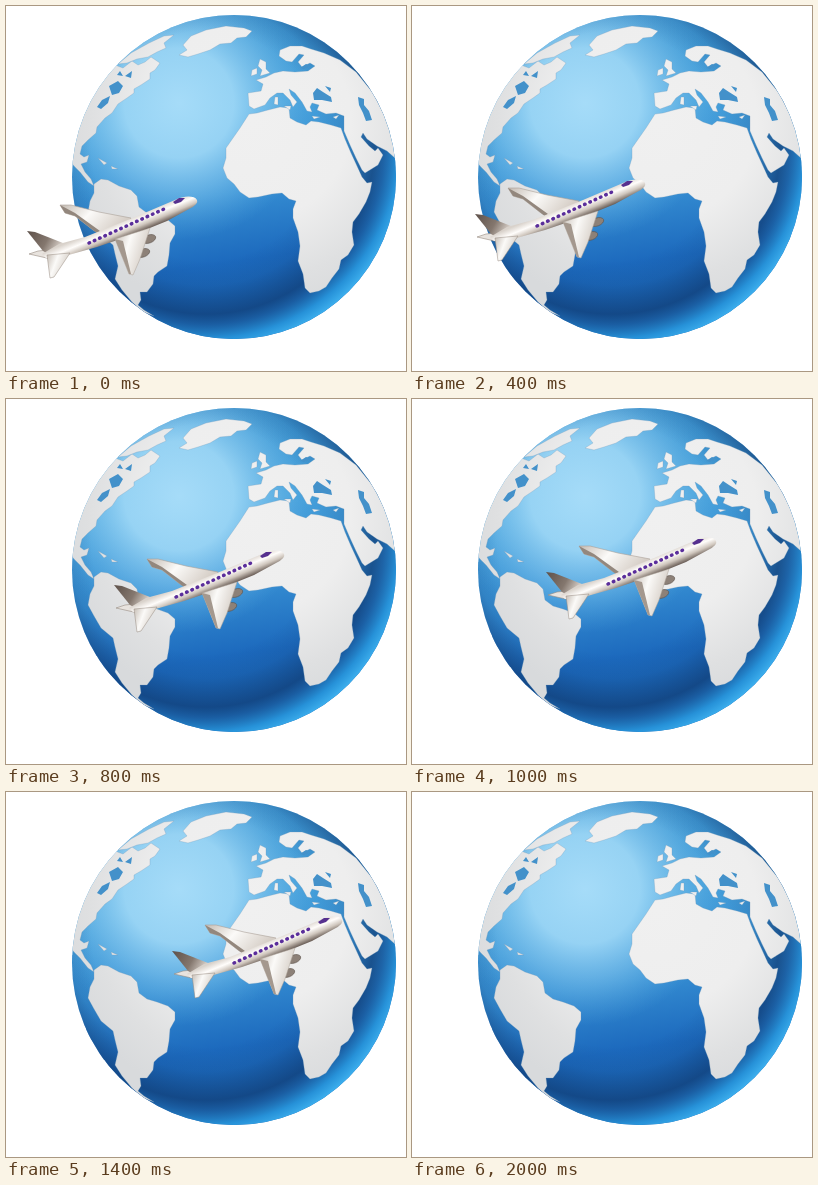
An HTML page that plays this animation: 400x365 px, repeating every 2200 ms.

```html
<!DOCTYPE html>
<html lang="en">
<head>
<meta charset="utf-8">
<title>Plane over the globe</title>
<style>
  html, body { margin: 0; width: 100%; height: 100%; overflow: hidden; background: #fff; }
  svg { display: block; }
</style>
</head>
<body>
<svg width="400" height="365" viewBox="0 0 400 365">
  <defs>
    <circle id="ball" cx="228" cy="171" r="162"/>
    <clipPath id="disc"><use href="#ball"/></clipPath>
    <linearGradient id="ocean" x1=".4" y1="0" x2=".55" y2="1">
      <stop offset="0" stop-color="#3a93d0"/>
      <stop offset=".3" stop-color="#459fda"/>
      <stop offset=".55" stop-color="#358dd2"/>
      <stop offset=".76" stop-color="#1c69bd"/>
      <stop offset="1" stop-color="#1a63b0"/>
    </linearGradient>
    <radialGradient id="glow" gradientUnits="userSpaceOnUse" cx="173" cy="97" r="137">
      <stop offset="0" stop-color="#aee1fb" stop-opacity=".92"/>
      <stop offset=".4" stop-color="#a9dffa" stop-opacity=".82"/>
      <stop offset=".65" stop-color="#8fd0f4" stop-opacity=".5"/>
      <stop offset="1" stop-color="#60b5e8" stop-opacity="0"/>
    </radialGradient>
    <!-- Dark crescent at the lower left, bright rim at the lower right -->
    <radialGradient id="rim" gradientUnits="userSpaceOnUse" cx="200" cy="140" r="205">
      <stop offset=".56" stop-color="#113f78" stop-opacity="0"/>
      <stop offset=".68" stop-color="#113f78" stop-opacity=".16"/>
      <stop offset=".82" stop-color="#113f78" stop-opacity=".75"/>
      <stop offset=".87" stop-color="#1a5c9f" stop-opacity=".85"/>
      <stop offset=".94" stop-color="#2691d8"/>
      <stop offset="1" stop-color="#3fb2f0"/>
    </radialGradient>
    <radialGradient id="land" gradientUnits="userSpaceOnUse" cx="245" cy="115" r="200">
      <stop offset="0" stop-color="#f0f0f0"/>
      <stop offset=".5" stop-color="#eeeeee"/>
      <stop offset=".8" stop-color="#dfe0e1"/>
      <stop offset="1" stop-color="#d8dadc"/>
    </radialGradient>
    <linearGradient id="body" gradientUnits="userSpaceOnUse" x1="-72" y1="19" x2="-65" y2="36">
      <stop offset="0" stop-color="#d9d2cb"/>
      <stop offset=".35" stop-color="#fffdfb"/>
      <stop offset=".65" stop-color="#cfc6bd"/>
      <stop offset="1" stop-color="#5f524b"/>
    </linearGradient>
    <linearGradient id="wing" x1="0" y1="0" x2="1" y2=".4">
      <stop offset="0" stop-color="#c4bbb2"/>
      <stop offset=".45" stop-color="#fbfaf8"/>
      <stop offset="1" stop-color="#d3cbc3"/>
    </linearGradient>
    <linearGradient id="fin" x1="0" y1="0" x2="1" y2=".4">
      <stop offset="0" stop-color="#5d5049"/>
      <stop offset=".6" stop-color="#84776e"/>
      <stop offset="1" stop-color="#d6cec7"/>
    </linearGradient>
  </defs>

  <g id="globe">
    <use href="#ball" fill="url(#ocean)"/>
    <use href="#ball" fill="url(#glow)"/>
    <use href="#ball" fill="url(#rim)"/>
    <g clip-path="url(#disc)">
      <g fill="url(#land)" stroke="#6f97b5" stroke-opacity=".35" stroke-width=".8" stroke-linejoin="round">
        <!-- Africa -->
        <path d="M243 108 251 107 262 104 274 101 283 102 284 112 291 116 300 119 305 115 313 116 325 119
          335 122 339 133 345 147 351 160 356 171 361 177 366 176 364 186 360 196 353 208 347 216 346 226
          348 239 342 249 335 254 333 263 326 272 320 281 313 285 304 287 299 282 297 268 292 255 294 240
          292 226 287 212 287 203 290 195 283 193 276 187 266 188 252 191 243 192 234 186 228 178 221 172
          217 162 220 152 220 142 227 132 234 122Z"/>
        <!-- Europe and Asia -->
        <path d="M243 100 242 87 255 85 257 78 250 74 260 71 268 67 277 65 289 66 302 65 309 60 304 57 296 61
          292 56 298 49 293 48 286 56 280 55 273 50 274 44 284 40 296 40 305 43 318 47 334 54 350 66 367 87
          380 112 390 140 390 153 381 145 371 140 361 133 357 127 355 131 363 140 369 145 372 142 377 149
          372 159 359 167 356 164 350 152 344 139 338 125 338 110 330 107 320 108 311 104 313 99 306 97
          304 101 306 106 301 105 296 96 289 87 283 83 285 89 291 96 287 101 284 94 277 87 271 87 264 92
          259 99 248 103Z"/>
        <path d="M254 53 260 56 260 63 264 67 254 70 256 64 252 60ZM246 64 251 62 251 68 245 70Z
          M269 91 272 91 272 99 268 98ZM278 100 285 100 284 104ZM306 110 314 111 308 113ZM327 111 333 109 330 113Z"/>
        <!-- Greenland -->
        <path d="M173 49 181 44 177 39 185 30 200 24 220 20 238 22 246 25 240 31 231 32 225 37 214 38 204 44
          192 48 182 51Z"/>
        <!-- North America -->
        <path d="M60 150 64 125 80 92 98 70 109 59 117 62 126 55 132 59 139 56 145 51 154 57 149 64 144 67
          144 73 135 79 128 83 128 87 121 92 112 98 106 107 99 112 91 121 90 127 82 134 76 140 74 148
          78 151 83 149 81 156 75 158 79 166 85 173 88 180 82 176 74 166 68 160Z"/>
        <path d="M112 58 125 47 143 37 158 30 168 29 158 37 160 42 151 46 142 51 131 53 121 57Z
          M92 152 101 157 98 159ZM105 160 112 163 106 163Z"/>
        <!-- South America -->
        <path d="M88 178 95 173 102 174 113 180 125 184 131 190 133 201 141 207 151 210 162 214 169 220 169 228
          164 237 163 249 161 260 152 266 148 270 147 278 141 286 134 286 135 294 132 299 138 304 148 310
          137 306 126 296 116 284 109 273 112 260 109 248 107 239 95 229 88 217 82 206 84 195 88 187Z"/>
      </g>
      <!-- Inland waters -->
      <path fill="#4391ca" d="M307 87 311 82 317 86 325 91 326 96 316 94 308 94Z
        M352 91 358 93 358 99 363 105 366 114 360 115 357 107 353 99Z
        M103 80 112 75 117 80 113 87 106 89ZM96 94 104 90 102 97 95 103 91 101Z
        M119 70 126 65 125 72ZM111 69 114 65 117 70ZM319 80 325 82 324 86ZM294 62 300 58 305 60 298 63Z"/>
    </g>
  </g>

  <!-- The nose is the plane's own origin -->
  <g id="plane" stroke-linejoin="round">
    <path d="M-137 5-126 5-98 12-66 18-72 28-94 36-104 30-122 16-132 13Z" fill="url(#wing)" stroke="#aaa097" stroke-width=".6"/>
    <path d="M-137 5-122 13-97 31-99 34-122 16-132 13Z" fill="#93877d"/>
    <g fill="#8d8178" stroke="#5f554e" stroke-width=".6">
      <ellipse cx="-48" cy="39" rx="7" ry="4" transform="rotate(-20 -48 39)"/>
      <ellipse cx="-54" cy="53" rx="7" ry="4" transform="rotate(-20 -54 53)"/>
    </g>
    <path d="M-168 54-159 51-140 49-146 59Z" fill="#e8e3de" stroke="#988c82" stroke-width=".6"/>
    <path d="M-170 31-162 32-134 43-143 57-154 51Z" fill="url(#fin)"/>
    <path d="M0 0C-3-5-14-4-22 0L-62 17-112 37-138 44-155 54-151 58-132 56-100 47-62 34-30 21-8 9Q2 4 0 0Z" fill="url(#body)"/>
    <path d="M-82 39-68 74-64 75-57 59-47 28Z" fill="url(#wing)" stroke="#aaa097" stroke-width=".5"/>
    <path d="M-82 39-68 74-66 74-74 41Z" fill="#a4988e"/>
    <path d="M-150 55-147 78-143 77-127 53Z" fill="url(#wing)" stroke="#94887e" stroke-width=".5"/>
    <path d="M-24 2-18-2-12-2-16 2-22 4Z" fill="#56308f"/>
    <path d="M-108 43-33 9" fill="none" stroke="#5a2d9b" stroke-width="3.5" stroke-linecap="round" stroke-dasharray=".6 5.2"/>
  </g>
</svg>
<script>
  const STEP = 200, STEPS = 11;
  // The last step has no position: the plane is out of sight.
  const nosePath = [
    [191, 194], [205, 188], [233, 177], [251, 168], [278, 155],
    [304, 142], [321, 135], [336, 128], [362, 117], [378, 110]
  ];
  const plane = document.getElementById('plane');

  function draw(now) {
    const nose = nosePath[Math.floor(now / STEP) % STEPS];
    plane.style.display = nose ? '' : 'none';
    if (nose) plane.setAttribute('transform', `translate(${nose})`);
    requestAnimationFrame(draw);
  }
  draw(performance.now());
</script>
</body>
</html>
```
